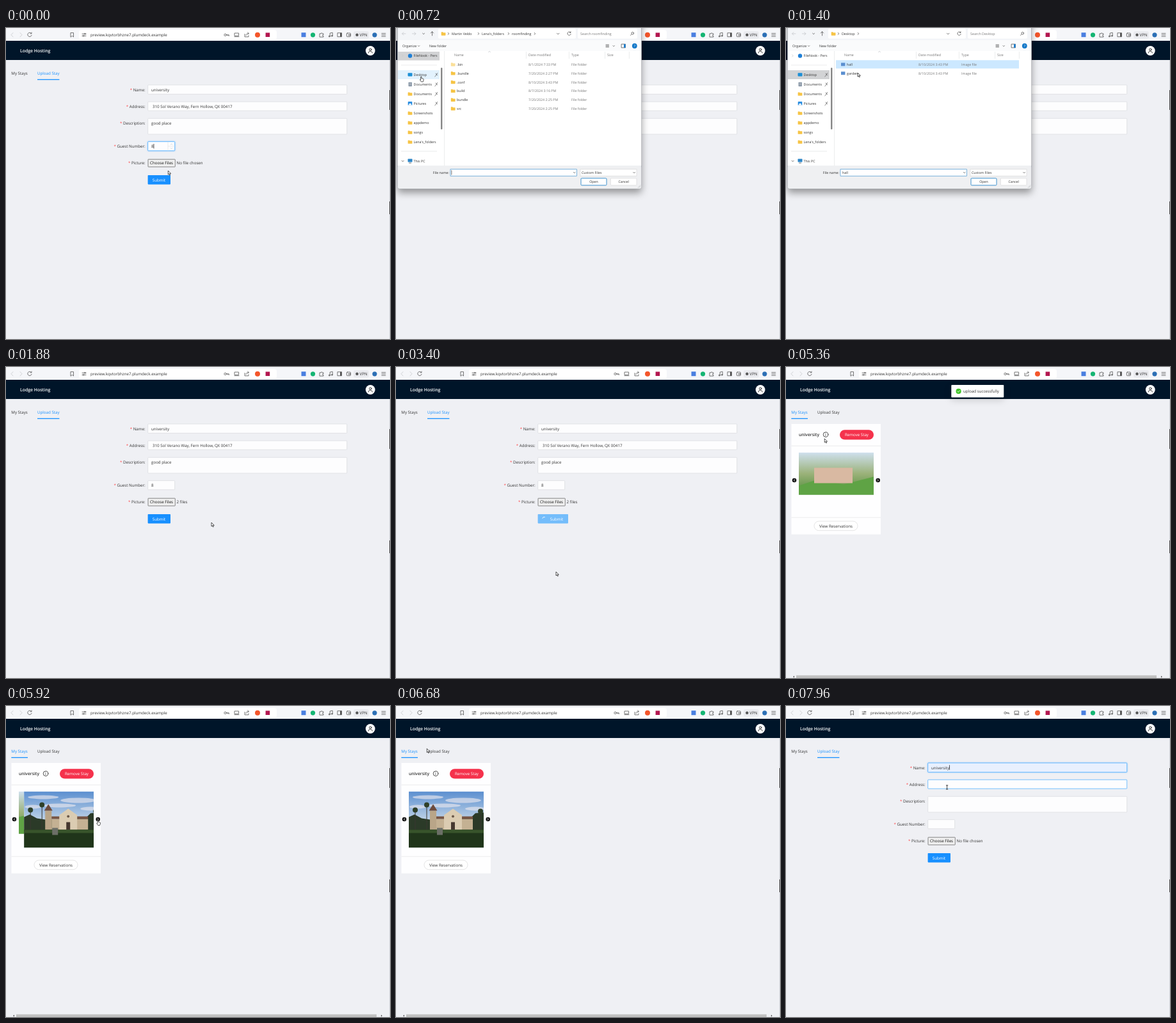
These frames come from a looping animation (600 px wide and 486 px high, 8 s). An HTML page:

```html
<!DOCTYPE html>
<html lang="en">
<head>
<meta charset="utf-8">
<title>Room upload</title>
<style>
  html, body { margin: 0; width: 100%; height: 100%; overflow: hidden; background: #eff0f4; }
  svg { display: block; width: 100%; height: 100%; }
  text { font: 6.2px "Open Sans", "Noto Sans", sans-serif; fill: #333; text-rendering: geometricPrecision; white-space: pre; }
  .mid { text-anchor: middle; }
  .end { text-anchor: end; }
  .bold { font-weight: 600; }
  .white { fill: #fff; }
  .grey { fill: #777; }
  #dialog text { font-size: 5.3px; }
  #dialog .grey { fill: #777; }
  .ln { fill: none; stroke: #555; stroke-width: .8; stroke-linecap: round; stroke-linejoin: round; }
  .pale { stroke: #c6c8cc; }
  .field { fill: #fdfdfe; stroke: #d9dade; stroke-width: .7; }
  .field.hot { stroke: #40a9ff; }
  .field.focus { stroke: #40a9ff; filter: drop-shadow(0 0 1px rgba(24,144,255,.5)); }
  .field.auto { fill: #e8f0fe; }
  .box { fill: #fff; stroke: #d4d4d4; stroke-width: .6; }
  .rule { fill: none; stroke: #e3e4e6; stroke-width: .7; }
</style>
</head>
<body>
<svg id="stage" viewBox="0 0 600 486" preserveAspectRatio="none"></svg>
<script>
const stage = document.getElementById('stage');
const LOOP = 8000;
const BLUE = '#1890ff', LIGHT = '#40a9ff', INK = '#333';

// markup helpers
const text = (x, y, s, cls = '', more = '') => `<text x="${x}" y="${y}" class="${cls}" ${more}>${s}</text>`;
const rect = (x, y, w, h, more = '') => `<rect x="${x}" y="${y}" width="${w}" height="${h}" ${more}/>`;
const line = (d, cls = '') => `<path d="${d}" class="ln ${cls}"/>`;
const rule = d => `<path d="${d}" class="rule"/>`;
const dot = (x, y, r, more) => `<circle cx="${x}" cy="${y}" r="${r}" ${more}/>`;
const group = (id, body, more = '') => `<g id="${id}" ${more}>${body}</g>`;
const folder = (x, y, more = '') =>
  `<path transform="translate(${x} ${y})" d="M0 .6q0-.6.6-.6h1.8l.9.9h3q.5 0 .5.5v3.4q0 .6-.6.6h-5.6q-.6 0-.6-.6z" fill="#f6c445" ${more}/>`;

function browserBar() {
  const icons =
    line('M11 7.5l-3 3.2 3 3.2M22 7.5l3 3.2-3 3.2', 'pale') +
    line('M39.5 8.3a3.2 3.2 0 1 0 .6 3M40 7v1.8h-1.9') +
    line('M101.3 7.5h4.2v6.5l-2.1-1.7-2.1 1.7z') +
    line('M119 9.2h3M124.5 9.2h.6M119 12.3h.6M122 12.3h3') +
    dot(123.2, 9.2, 1, 'class="ln"') + dot(120.8, 12.3, 1, 'class="ln"') +
    dot(342.6, 10.8, 1.7, 'class="ln"') + line('M344.4 10.8h4v1.6M346.6 10.8v1.3') +
    line('M357.4 8h6.2v4.2h-6.2zM357 13.6h7') +
    line('M373 9.5v4.3h6v-2M375 11.5c.2-2 1.5-3 4-3M377.6 6.8l1.7 1.7-1.7 1.7') +
    dot(393, 10.8, 4, 'fill="#f4562a"') +
    rect(405.6, 7.4, 6.6, 6.6, 'fill="#b3174f"') +
    rect(461.5, 7.2, 7, 7, 'fill="#4a7fe0"') +
    dot(479.5, 10.8, 3.6, 'fill="#15b573"') +
    line('M490.4 8.8h1.8a1 1 0 1 1 2 0h1.8v1.8a1 1 0 1 0 0 1.8v1.7h-5.6z') +
    line('M506.2 13v-5l4-.8v5') + dot(505.2, 13, 1, 'class="ln"') + dot(509.2, 12.3, 1, 'class="ln"') +
    rect(518.3, 7.7, 6.2, 6, 'class="ln"') + rect(522, 7.7, 2.4, 6, 'fill="#555"') +
    rect(532.3, 8, 6.2, 5.6, 'rx="1" class="ln"') + line('M535.7 10.2h2.8v1.6h-2.8z') +
    rect(543, 5, 24, 11.5, 'rx="3" fill="#eaebef"') + dot(548.5, 10.8, 2.2, 'fill="#555"') +
    text(552.6, 13, 'VPN') +
    dot(576, 10.8, 3.6, 'fill="#2c6fb5"') +
    line('M587 8.4h6M587 10.8h6M587 13.2h6');
  return rect(0, 0, 600, 20, 'fill="#f5f6f9"') +
    rect(114, 3, 309, 15.4, 'rx="4" fill="#fff"') +
    text(132, 12.9, 'preview.kqvtorbhzne7.plumdeck.example') + icons;
}

function siteHeader() {
  return rect(0, 20, 600, 30, 'fill="#001529"') +
    text(22, 38, 'Lodge Hosting', 'bold white', 'style="font-size:6.9px"') +
    dot(569.3, 35.5, 7.4, 'fill="#fff"') +
    dot(569.3, 33.7, 1.7, 'class="ln" style="stroke:#111"') +
    `<path class="ln" style="stroke:#111" d="M566.3 39c.2-4 5.8-4 6 0"/>` +
    rect(599, 50, 1, 436, 'fill="#d4d7dc"') +
    rect(599, 97, 1, 31, 'fill="#444"') + rect(599, 271, 1, 20, 'fill="#444"');
}

function form() {
  const label = (y, s) => text(217.7, y, `<tspan fill="#ff4d4f">*</tspan> ${s}:`, 'end');
  const field = (id, y, w, h) => rect(221.7, y, w, h, `id="${id}" class="field" rx=".8"`);
  return label(98.7, 'Name') + label(124.8, 'Address') + label(151, 'Description') +
    label(187, 'Guest Number') + label(213.4, 'Picture') +
    field('name', 89, 311, 14.4) + field('addr', 115.2, 311, 14) +
    field('desc', 141.3, 311, 24.7) + field('guest', 177.6, 42, 14.2) +
    text(227, 98.7, 'university', '', 'id="nameText"') +
    group('restText', text(229, 124.8, '310 Sol Verano Way, Fern Hollow, QX 00417') +
      text(227, 151, 'good place') + text(227, 187, '8')) +
    group('stepper', rule('M253 178v13.6M253 184.8h10.5') +
      line('M257.3 182.2l1.2-1.2 1.2 1.2M257.3 187.6l1.2 1.2 1.2-1.2', 'pale') + rect(230.6, 181, .7, 7.4, 'fill="#111"')) +
    rect(255.2, 92.3, .7, 7.6, 'id="nameCaret" fill="#111"') +
    rect(222, 205.2, 42.3, 11.8, 'rx=".6" fill="#efefef" stroke="#6b6b6b" stroke-width=".8"') +
    text(243.1, 213.4, 'Choose Files', 'mid', 'style="fill:#111"') +
    text(266.6, 213.4, '', '', 'id="fileText"') +
    rect(221.6, 230, 35.4, 14.4, 'id="submit" rx=".8"') +
    text(239, 239.5, 'Submit', 'mid white', 'id="submitText"') +
    group('spin', '<path d="M0-2.8a2.8 2.8 0 0 1 2.8 2.8" class="ln" style="stroke:#fff"/>');
}

function photos() {
  const palm = (x, y) => rect(x - .5, y, 1, 60 - y, 'fill="#3a3730"') + dot(x, y, 4, 'fill="#2f4029"');
  const cloud = (x, y, rx, ry) => `<ellipse cx="${x}" cy="${y}" rx="${rx}" ry="${ry}" fill="#e9e6ee" opacity=".65"/>`;
  const shape = (pts, fill) => `<polygon points="${pts}" fill="${fill}"/>`;
  const hall = rect(0, 0, 117, 88, 'fill="url(#sky)"') +
    cloud(30, 9, 24, 3) + cloud(85, 14, 28, 4) + cloud(55, 22, 26, 3) + cloud(104, 27, 16, 3) + cloud(14, 24, 13, 3) +
    shape('0,61 0,40 9,36 20,42 33,44 96,42 104,34 117,33 117,61', '#2b3a28') +
    palm(10, 29) + palm(28, 21) + palm(112, 31) +
    rect(33, 30, 10, 30, 'fill="#b9a588"') + shape('31.5,30 38,20 44.5,30', '#6d4b3d') +
    rect(43, 43, 57, 17, 'fill="#c4b193"') + rect(43, 39, 57, 4, 'fill="#775544"') +
    shape('55,60 55,37 69,27 83,37 83,60', '#dbccb2') + rect(66, 48, 6, 12, 'fill="#463830"') +
    dot(69, 39, 2, 'fill="#6b5848"') +
    rect(0, 60, 117, 28, 'fill="#20351a"') + rect(0, 60, 117, 5, 'fill="#38542b"') + rect(44, 57, 9, 11, 'fill="#6c6f67"');
  const garden = rect(0, 0, 117, 66, 'fill="url(#garden)"') +
    shape('0,52 30,42 70,50 117,38 117,66 0,66', '#5fa345') + rect(24, 24, 60, 24, 'fill="#d9b9a2"');
  return `<defs>
    <linearGradient id="sky" x1="0" y1="0" x2="0" y2="1"><stop offset="0" stop-color="#5b8fd0"/><stop offset=".6" stop-color="#d0deeb"/></linearGradient>
    <linearGradient id="garden" x1="0" y1="0" x2="0" y2="1"><stop offset="0" stop-color="#cfe0ee"/><stop offset=".5" stop-color="#9bb27a"/><stop offset="1" stop-color="#4c8a35"/></linearGradient>
    <clipPath id="frame">${rect(20, 133.5, 117, 88)}</clipPath>
    ${group('hall', hall)}${group('garden1', garden)}</defs>`;
}

function stays() {
  const slides = [0, 1, 2, 3].map(i => `<use href="#${i % 2 ? 'hall' : 'garden1'}" x="${i * 117}"/>`).join('');
  const arrow = (x, d) => dot(x, 177, 3.3, 'fill="#111"') +
    `<path class="ln" style="stroke:#fff" d="M${x - d * .6} 175.6l${d * 1.3} 1.4l${-d * 1.3} 1.4"/>`;
  return photos() + rect(8.4, 89, 139.6, 172.6, 'fill="#fefeff"') +
    rule('M8.4 123.3h139.6M8.4 235.2h139.6') +
    text(20, 108.3, 'university', 'bold', 'style="font-size:6.7px"') +
    dot(62, 105.6, 3.8, 'class="ln" style="stroke:#222"') + line('M62 105.2v2.3M62 103.5v.1') +
    rect(84, 98.2, 53, 15.4, 'rx="7.7" fill="#f5324c"') + text(110.5, 108.1, 'Remove Stay', 'mid white') +
    `<g clip-path="url(#frame)">${group('track', slides)}</g>` +
    arrow(13, -1) + arrow(143.7, 1) +
    rect(44, 241, 68, 14.6, 'rx="7.3" class="box"') + text(78, 250.6, 'View Reservations', 'mid') +
    rect(16, 481.8, 563, 4.2, 'fill="#c1c1c1"') +
    '<path d="M13 482.5v3l-2-1.5zM586 482.5v3l2-1.5z" fill="#555"/>';
}

function dialog() {
  const side = ['Desktop', 'Documents', 'Documents', 'Pictures', 'Screenshots', 'appdemo', 'songs', "Lena's_folders"];
  const sideRow = (s, i) => {
    const y = 75 + i * 15;
    const icon = i === 0 ? rect(18.5, y - 4.8, 7, 5.2, 'rx=".8" fill="#1c8fd6"') :
      i === 1 ? rect(19.5, y - 5.2, 5.4, 6.4, 'rx=".6" fill="#8695a6"') + line(`M21 ${y - 3.4}h2.4M21 ${y - 1.4}h2.4`, 'pale') :
      i === 3 ? rect(18.7, y - 5, 6.6, 6, 'rx=".8" fill="#2b8ee0"') + `<path d="M19 ${y + .7}l3-3.4 3 3.4z" fill="#fff"/>` :
      folder(18.6, y - 4.6);
    const pin = i < 4 ? line(`M62 ${y - 3.8}l2.6 2.6M64.6 ${y - 4.4}l-2 3.4-1.8 1.8`) : '';
    return icon + text(27.6, y, s) + pin;
  };
  const row = (i, name, date, type, icon) => {
    const y = 59 + i * 13.8;
    return icon(y) + text(95, y, name) + text(207, y, date, 'grey') + text(274, y, type, 'grey');
  };
  const dirs = [['.bin', '8/1/2024 7:33 PM'], ['.bundle', '7/20/2024 2:27 PM'], ['.conf', '8/10/2024 3:43 PM'],
    ['build', '8/7/2024 3:16 PM'], ['bundle', '7/20/2024 2:25 PM'], ['src', '7/20/2024 2:25 PM']]
    .map(([n, d], i) => row(i, n, d, 'File folder', y => folder(85.8, y - 4.7, i ? '' : 'opacity=".55"'))).join('');
  const pics = ['hall', 'garden'].map((n, i) => rect(78, 50.3 + i * 13.8, 286, 13, `id="pick${i}" fill="#cce8ff"`) +
    row(i, n, '8/10/2024 3:43 PM', 'Image file', y => rect(86, y - 4.6, 6.4, 5, 'fill="#5b8fd0"'))).join('');
  const crumb = (x, s) => text(x, 10.8, s);
  const chev = x => line(`M${x - .7} 7.4l1.3 1.5-1.3 1.5`);
  const sorted = line('M144.5 37.6l1.5-1.2 1.5 1.2', 'pale');
  return rect(2.5, -20, 381, 271.3, 'rx="4" fill="#f3f5f8" stroke="#9a9da2" stroke-width=".6" style="filter:drop-shadow(0 6px 6px rgba(0,0,0,.38))"') +
    rect(66, 1, 215, 15.5, 'rx="2" fill="#fff"') + rect(284, 1, 93, 15.5, 'rx="2" fill="#fff"') +
    line('M15 8.9h-5.4M11.8 6.7l-2.2 2.2 2.2 2.2M25.5 8.9h5.4M28.7 6.7l2.2 2.2-2.2 2.2', 'pale') +
    line('M41.6 8.2l1.5 1.5 1.5-1.5M56.5 11.8v-6M54.2 8l2.3-2.3 2.3 2.3M251.5 8.2l1.7 1.7 1.7-1.7') +
    line('M272.8 7a2.7 2.7 0 1 0 .4 2.6M273 5.8v1.5h-1.6') +
    folder(70.7, 6.3) + chev(82) +
    group('path0', crumb(87, 'Martin Veldo') + chev(129) + crumb(134, "Lena's_folders") + chev(176) + crumb(181, 'roomfinding') + chev(217) +
      text(288, 10.8, 'Search roomfinding', 'grey')) +
    group('path1', crumb(87, 'Desktop') + chev(113) + text(288, 10.8, 'Search Desktop', 'grey')) +
    dot(369.7, 8.2, 1.8, 'class="ln"') + line('M368.3 9.6l-1.8 1.8') +
    rect(2.8, 19, 380.4, 17, 'fill="#fafbfc"') +
    text(10, 30, 'Organize') + line('M34.4 27.6l1.2 1.2 1.2-1.2') + text(52, 30, 'New folder') +
    line('M328 26.2h4.5M328 28h4.5M328 29.8h4.5M339 27.6l1.2 1.2 1.2-1.2') +
    rect(352.5, 25.2, 6, 5.6, 'class="ln"') + rect(356, 25.2, 2.6, 5.6, 'fill="#1c7fd0"') +
    dot(372.8, 28, 3.9, 'fill="#1478c8"') + text(372.8, 29.9, '?', 'mid white') +
    rect(2.8, 36, 380.4, 179, 'fill="#fff"') +
    rect(3, 37, 65, 13.6, 'id="cloudRow" fill="#d2d3d5"') + rect(3, 66, 65, 14, 'id="deskRow"') +
    line('M9.6 41.8l1.5 1.6-1.5 1.6', 'pale') + dot(22, 43.5, 3.2, 'fill="#1e7fd6"') +
    text(27.6, 45.3, 'FileNook - Pers') + rule('M8 58h56M8 192.5h56') +
    side.map(sideRow).join('') +
    line('M9 207.2l1.6 1.6 1.6-1.6') + rect(18.5, 204.6, 7, 4.8, 'rx=".6" fill="#2d86c8"') + line('M20.4 211h3.2') +
    text(27.6, 209.9, 'This PC') +
    rect(70, 62, 2.4, 96.5, 'rx="1.2" fill="#868686"') +
    rule('M75.5 36v179M203.4 37v11M270.4 37v11M326.6 37v11M364.4 37v11') + sorted +
    text(91, 44, 'Name', 'grey') + text(207, 44, 'Date modified', 'grey') + text(274, 44, 'Type', 'grey') + text(330, 44, 'Size', 'grey') +
    group('dir0', dirs) + group('dir1', pics) +
    rect(2.8, 215, 380.4, 36, 'rx="3" fill="#eff0f2"') +
    text(83, 228, 'File name:', 'end') +
    rect(85, 220.8, 197.5, 10.4, 'class="box" style="stroke:#2a86c9"') + line('M277.4 225.4l1.3 1.3 1.3-1.3') +
    rect(86.6, 222.3, .6, 7.2, 'id="fileCaret" fill="#222"') + text(88, 228, '', '', 'id="fileName"') +
    rect(288, 220.8, 88, 10.4, 'class="box"') + text(290, 228, 'Custom Files') + line('M370.8 225.4l1.3 1.3 1.3-1.3') +
    rect(289, 234.8, 40, 11, 'rx="1.2" class="box" style="stroke:#2a86c9;stroke-width:.9"') + text(309, 242.2, 'Open', 'mid') +
    rect(335.4, 234.8, 40.6, 11, 'rx="1.2" class="box"') + text(355.7, 242.2, 'Cancel', 'mid') +
    line('M380 249.4l2-2M378 249.6l4-4', 'pale');
}

const message = rect(258.3, 28, 82, 19.6, 'rx="1" fill="#fff" style="filter:drop-shadow(0 4px 6px rgba(0,0,0,.16))"') +
  dot(269.6, 37.9, 4.1, 'fill="#3fc428"') +
  '<path d="M267.8 38l1.3 1.4 2.4-2.8" class="ln" style="stroke:#fff"/>' +
  text(277, 40.2, 'upload successfully');

const pen = 'fill="#fff" stroke="#111" stroke-width=".7" stroke-linejoin="round"';
const pointers =
  `<path id="arrow" d="M0 0v6l1.4-1.2 1 2.2 1-.5-1-2.1h1.9z" ${pen}/>` +
  `<path id="hand" d="M-.6 5.2V.6q.6-1 1.2 0v2.5l2.6.7q.8.3.7 1l-.5 2.6-.5 1.1h-2.7l-2-2.9q-.2-1.2 1.2-.4z" ${pen}/>` +
  '<path id="beam" d="M-1.3-3h2.6M0-3v6M-1.3 3h2.6" class="ln" style="stroke:#222"/>';

stage.innerHTML = rect(0, 0, 600, 486, 'fill="#eff0f4"') + browserBar() + siteHeader() +
  text(8.3, 73, 'My Stays', '', 'id="tabMy"') + text(49, 73, 'Upload Stay', '', 'id="tabUp"') +
  rect(49, 79.9, 34, 1.3, `id="ink" fill="${BLUE}"`) +
  group('form', form()) + group('stays', stays()) + group('message', message) +
  group('dialog', dialog()) + group('cursor', pointers);

const el = {};
stage.querySelectorAll('[id]').forEach(n => el[n.id] = n);
const show = (id, on) => { el[id].style.display = on ? '' : 'none'; };
const attr = (id, o) => { for (const k in o) el[id].setAttribute(k, o[k]); };
const within = (t, a, b) => t >= a && t < b;
const ramp = (t, a, b) => Math.min(1, Math.max(0, (t - a) / (b - a)));
const out = u => 1 - (1 - u) ** 3;
const smooth = u => u * u * (3 - 2 * u);
const mix = (a, b, u) => a + (b - a) * u;

// time, x, y of the pointer
const route = [
  [0, 253.3, 223], [80, 253.3, 223], [200, 246, 211], [320, 246, 211], [720, 39.3, 75.5],
  [1000, 39.3, 75.5], [1200, 110, 57], [1280, 110, 57], [1400, 112, 70], [1480, 112, 70], [1720, 321, 243],
  [1900, 321, 243], [2240, 240, 236], [2360, 240, 236], [2560, 250, 320], [4120, 250, 320], [4360, 256, 321],
  [4540, 256, 321], [4840, 9.3, 71.5], [5160, 9.3, 71.5], [5640, 143.6, 178],
  [6679, 143.6, 178], [6680, 48.3, 66.6], [6800, 60, 69], [7480, 60, 70],
  [7700, 245, 96], [7800, 245, 96], [7940, 251.6, 127]
];
const looks = [[0, 'arrow'], [640, 'hand'], [1120, 'arrow'], [2180, 'hand'], [2400, 'arrow'], [4800, 'hand'],
  [5280, 'arrow'], [5600, 'hand'], [6680, 'arrow'], [6740, 'hand'], [7540, 'arrow'], [7640, 'beam']];
const SHOW_STAYS = 5000, SHOW_FORM = 6840;

function place(t) {
  const i = route.findIndex(k => k[0] > t);
  if (i < 0) return route[route.length - 1].slice(1);
  const [a, x0, y0] = route[i - 1], [b, x1, y1] = route[i];
  const u = smooth(ramp(t, a, b));
  return [mix(x0, x1, u), mix(y0, y1, u)];
}

function drawForm(t) {
  const fresh = t >= SHOW_FORM;
  const nameFocus = t >= 7700, auto = t >= 7800;
  const guestFocus = t < 260;
  show('nameText', !fresh || auto);
  show('restText', !fresh);
  show('stepper', guestFocus);
  show('nameCaret', nameFocus && auto);
  attr('name', { class: 'field' + (nameFocus ? ' focus' : '') + (auto ? ' auto' : '') });
  attr('addr', { class: 'field' + (t >= 7880 ? ' hot' : '') });
  attr('guest', { class: 'field' + (guestFocus ? ' focus' : '') });
  el.fileText.textContent = within(t, 1760, SHOW_FORM) ? '2 files' : 'No file chosen';

  const grow = ramp(t, 2320, 2440) * (1 - ramp(t, 4160, 4280));
  const busy = within(t, 2320, 4200);
  attr('submit', { width: 35.4 + 12 * grow, fill: within(t, 2200, SHOW_FORM) ? LIGHT : BLUE, opacity: busy ? .7 : 1 });
  attr('submitText', { x: 239 + 12 * grow });
  show('spin', busy);
  attr('spin', { transform: `translate(231.5 237.2) rotate(${t * .72 % 360})`, opacity: grow });
}

function drawDialog(t) {
  const alpha = ramp(t, 320, 420) * (1 - ramp(t, 1760, 1840));
  const size = .94 + .06 * alpha;
  show('dialog', alpha > 0);
  attr('dialog', { opacity: alpha, transform: `translate(193 110) scale(${size}) translate(-193 -110)` });
  const moved = t >= 1040;
  show('path0', !moved); show('dir0', !moved);
  show('path1', moved); show('dir1', moved);
  show('cloudRow', !moved);
  show('deskRow', t >= 660);
  attr('deskRow', { fill: moved ? '#d2d3d5' : '#e3f2fd' });
  show('pick0', t >= 1240); show('pick1', t >= 1440);
  show('fileCaret', t < 1240);
  el.fileName.textContent = t < 1240 ? '' : t < 1440 ? 'hall' : '"garden" "hall"';
}

function draw(t) {
  const onStays = within(t, SHOW_STAYS, SHOW_FORM);
  show('form', !onStays);
  show('stays', onStays);
  drawForm(t);
  drawDialog(t);

  const tab = smooth(ramp(t, SHOW_STAYS, SHOW_STAYS + 150)) - smooth(ramp(t, SHOW_FORM, SHOW_FORM + 150));
  attr('ink', { x: mix(49, 8.3, tab), width: mix(34.4, 25.7, tab) });
  el.tabMy.style.fill = onStays ? BLUE : within(t, 4800, SHOW_STAYS) ? LIGHT : INK;
  el.tabUp.style.fill = !onStays ? BLUE : t >= 6740 ? LIGHT : INK;

  const slide = out(ramp(t, 5780, 6020)) + out(ramp(t, 6020, 6200)) + out(ramp(t, 6200, 6400));
  attr('track', { transform: `translate(${20 - 117 * slide} 133.5)` });

  const note = out(ramp(t, 4160, 4320)) * (1 - ramp(t, 5560, 5680));
  show('message', note > 0);
  attr('message', { opacity: note, transform: `translate(0 ${-8 * (1 - note)})` });

  const [x, y] = place(t);
  attr('cursor', { transform: `translate(${x} ${y})` });
  const look = looks.filter(k => k[0] <= t).pop()[1];
  for (const id of ['arrow', 'hand', 'beam']) show(id, id === look);
}

const start = performance.now();
function tick() {
  draw((performance.now() - start) % LOOP);
  requestAnimationFrame(tick);
}
tick();
</script>
</body>
</html>
```
